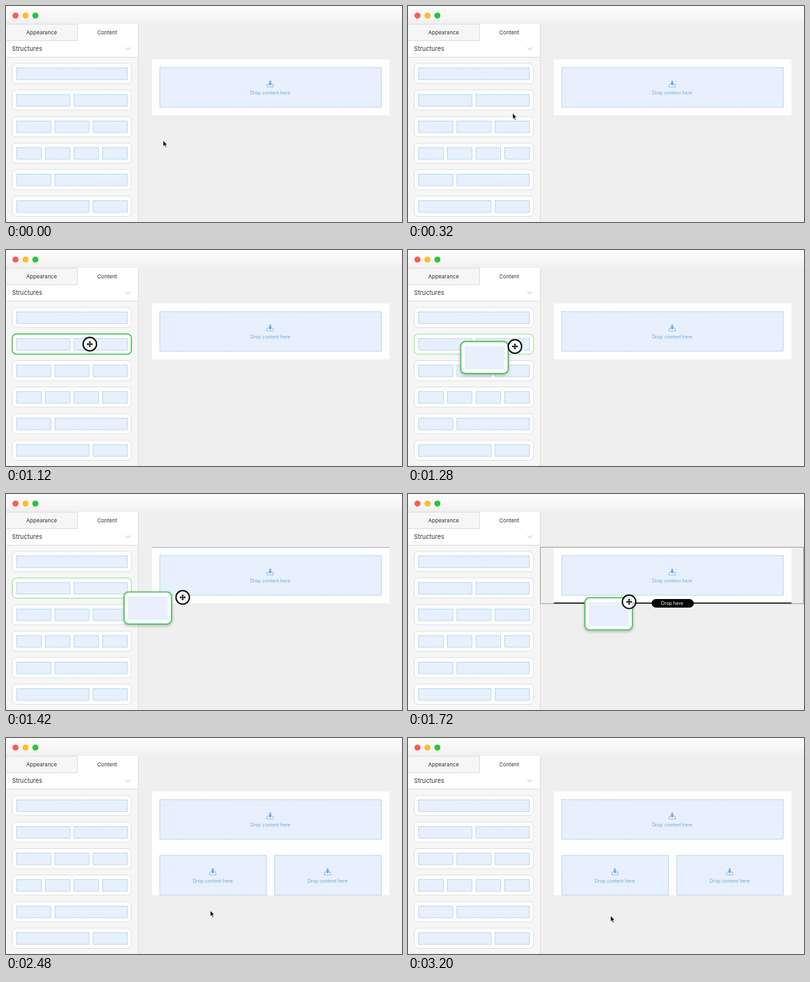
Write an HTML page that moves like this. It is 600 px wide and 327 px high and loops after 3.28 s.

```html
<!DOCTYPE html>
<html lang="en">
<head>
<meta charset="utf-8">
<title>Drag a structure</title>
<style>
html, body { margin: 0; width: 100%; height: 100%; overflow: hidden; background: #efefef }
svg { display: block; font-family: Inter, Roboto, sans-serif }
.slot { fill: #e7f0fc; stroke: #8bb6e1; stroke-width: .8; stroke-dasharray: 2 1 }
.row { fill: #fff; stroke: #dedede }
.hint { fill: #6fa8dc; font-size: 7.1px; text-anchor: middle }
.mid { text-anchor: middle; font-size: 8.1px }
</style>
</head>
<body>
<svg width="600" height="327" viewBox="0 0 600 327">
  <defs>
    <linearGradient id="bar" x2="0" y2="1">
      <stop stop-color="#fdfcfc"/><stop offset=".65" stop-color="#f7f5f5"/><stop offset="1" stop-color="#f0efef"/>
    </linearGradient>
    <filter id="shadow" x="-30%" y="-30%" width="160%" height="170%">
      <feDropShadow dx="0" dy="2" stdDeviation="2" flood-opacity=".25"/>
    </filter>
  </defs>
  <rect width="600" height="327" fill="#efefef"/>
  <rect width="600" height="27" fill="url(#bar)"/>
  <circle cx="14.4" cy="14.5" r="4.6" fill="#fc5b57"/>
  <circle cx="29.5" cy="14.5" r="4.6" fill="#fdbc2e"/>
  <circle cx="44.5" cy="14.5" r="4.6" fill="#27c53f"/>

  <rect y="27" width="200" height="300" fill="#f6f6f6"/>
  <path d="M108 27H200V77H0V52H108Z" fill="#fff"/>
  <path d="M0 27.5H108M0 52.5H108.5V27M0 77.5H200M200.5 27V327" fill="none" stroke="#dcdcdc"/>
  <g fill="#333">
    <text class="mid" x="54" y="43">Appearance</text>
    <text class="mid" x="153.3" y="43">Content</text>
    <text x="9" y="68" font-size="9.4">Structures</text>
  </g>
  <path d="M181 62.7l3.6 3.6 3.6-3.6" fill="none" stroke="#b5b5b5"/>
  <g id="rows"></g>

  <rect id="sheet" x="221" y="81" width="360" height="84.5" fill="#fff"/>
  <g id="first"></g>
  <g id="added"></g>
  <path id="topLine" d="M221 81H581" stroke="#8fa9d0" stroke-width="1.2"/>
  <g id="zone">
    <rect x="200.5" y="80.5" width="399" height="85.5" fill="none" stroke="#9a9a9a"/>
    <path d="M221 165.2H581" stroke="#222" stroke-width="1.7"/>
    <rect x="369" y="159" width="64" height="13" rx="6.5" fill="#050505"/>
    <text x="400.5" y="168.2" font-size="7.1" text-anchor="middle" fill="#fff">Drop here</text>
  </g>

  <g id="card">
    <rect x="1" y="1" width="72" height="48.5" rx="7" fill="#fff" stroke="#4cc552" stroke-width="1.8" filter="url(#shadow)"/>
    <rect x="7" y="7.5" width="60" height="36" fill="#e7f0fc"/>
  </g>
  <g id="cursor">
    <circle id="ring" r="10.2" fill="#fff" fill-opacity=".65" stroke="#0a0a0a" stroke-width="2"/>
    <path id="arrow" d="M0 0V9.2L2.1 7.3 3.6 10.8 5.2 10.1 3.7 6.7H6.5Z" fill="#000" stroke="#fff" stroke-width=".8"/>
    <g id="cross">
      <path d="M-3.5 0H3.5M0-3.5V3.5M0-4.8L-1.7-2.8H1.7ZM0 4.8L-1.7 2.8H1.7ZM-4.8 0L-2.8-1.7V1.7ZM4.8 0L2.8-1.7V1.7Z"
        stroke="#fff" stroke-width="2" fill="#fff"/>
      <path d="M-3.5 0H3.5M0-3.5V3.5" stroke="#000" stroke-width="1.4"/>
      <path d="M0-4.8L-1.9-2.6H1.9ZM0 4.8L-1.9 2.6H1.9ZM-4.8 0L-2.6-1.9V1.9ZM4.8 0L2.6-1.9V1.9Z"/>
    </g>
  </g>
</svg>
<script>
const $ = id => document.getElementById(id);
const LOOP = 3280, DROP = 2240;

const slot = (x, y, w, h) => `<rect class="slot" x="${x}" y="${y}" width="${w}" height="${h}"/>`;

// Column widths in twelfths
const layouts = [[12], [6, 6], [4, 4, 4], [3, 3, 3, 3], [4, 8], [8, 4]];
$('rows').innerHTML = layouts.map((cols, i) => {
  const y = 87 + i * 40.2;
  let x = 16;
  return `<rect class="row" x="9.5" y="${y}" width="180.5" height="30.5" rx="6"/>` + cols.map(n => {
    const w = n * 14.5 - 6, box = slot(x, y + 6.7, w, 17.6);
    x += w + 6;
    return box;
  }).join('');
}).join('');
const hoverRow = document.querySelectorAll('.row')[1];

const dropBox = (x, y, w) => {
  const c = x + w / 2;
  return slot(x, y, w, 60) +
    `<g transform="translate(${c - .5} ${y + 20})" fill="#72a9e0">
      <path d="M-1.4 0H1.4V4H3.4L0 7.4-3.4 4H-1.4Z"/>
      <path d="M-3 5.5H-4.8V9.6H4.8V5.5H3" fill="none" stroke="#72a9e0" stroke-width=".9" stroke-dasharray="1.6 .6"/>
    </g><text class="hint" x="${c - .5}" y="${y + 41}">Drop content here</text>`;
};
$('first').innerHTML = dropBox(233, 93.2, 335.5);
$('added').innerHTML = dropBox(233, 177.7, 161.7) + dropBox(407, 177.7, 161.7);

const part = (t, a, b) => Math.min(1, Math.max(0, (t - a) / (b - a)));
const ease = (t, a, b) => .5 - .5 * Math.cos(Math.PI * part(t, a, b));

function pointer(t) {
  const reach = ease(t, 0, 520), drift = ease(t, 560, 1080);
  const drag = ease(t, 1172, 1577), leave = ease(t, 1960, 2580);
  return [
    238 - 117 * reach + 6 * drift + 208 * drag - 28 * leave ** 1.4,
    203.5 - 61 * reach + 20.7 * drag + 104.3 * leave + 1.5 * ease(t, 2580, 2900)
  ];
}

const show = (id, on) => $(id).setAttribute('display', on ? 'inline' : 'none');
const place = (id, x, y) => $(id).setAttribute('transform', `translate(${x} ${y})`);

function draw(t) {
  const [x, y] = pointer(t);
  const over = t < 1240 && x < 190 && y < 158;
  const carrying = t >= 1200 && t < DROP;
  const source = carrying && t < 1480;
  const dropped = t >= DROP;

  hoverRow.style.stroke = over || source ? (over ? '#4cc552' : '#8fdc92') : '';
  hoverRow.style.strokeWidth = over ? 1.8 : 1;

  place('cursor', x, y);
  const cross = over || carrying;
  show('cross', cross);
  show('arrow', !cross);
  const press = part(t, 900, 1000) * (1 - part(t, 1940, 2020));
  show('ring', press > 0);
  $('ring').setAttribute('transform', `scale(${.6 + .4 * press})`);
  $('ring').setAttribute('opacity', press);

  // The card trails the pointer and stays put once released
  const [cx, cy] = pointer(Math.min(t, 1900) - 28);
  show('card', carrying);
  place('card', cx - 68 + ease(t, 1800, 2100), cy - 7);

  show('topLine', t >= 1380 && t < 1480);
  show('zone', t >= 1480 && !dropped);
  show('added', dropped);
  $('sheet').setAttribute('height', dropped ? 157 : 84.5);
}

const start = performance.now();
function frame() {
  draw((performance.now() - start) % LOOP);
  requestAnimationFrame(frame);
}
frame();
</script>
</body>
</html>
```
